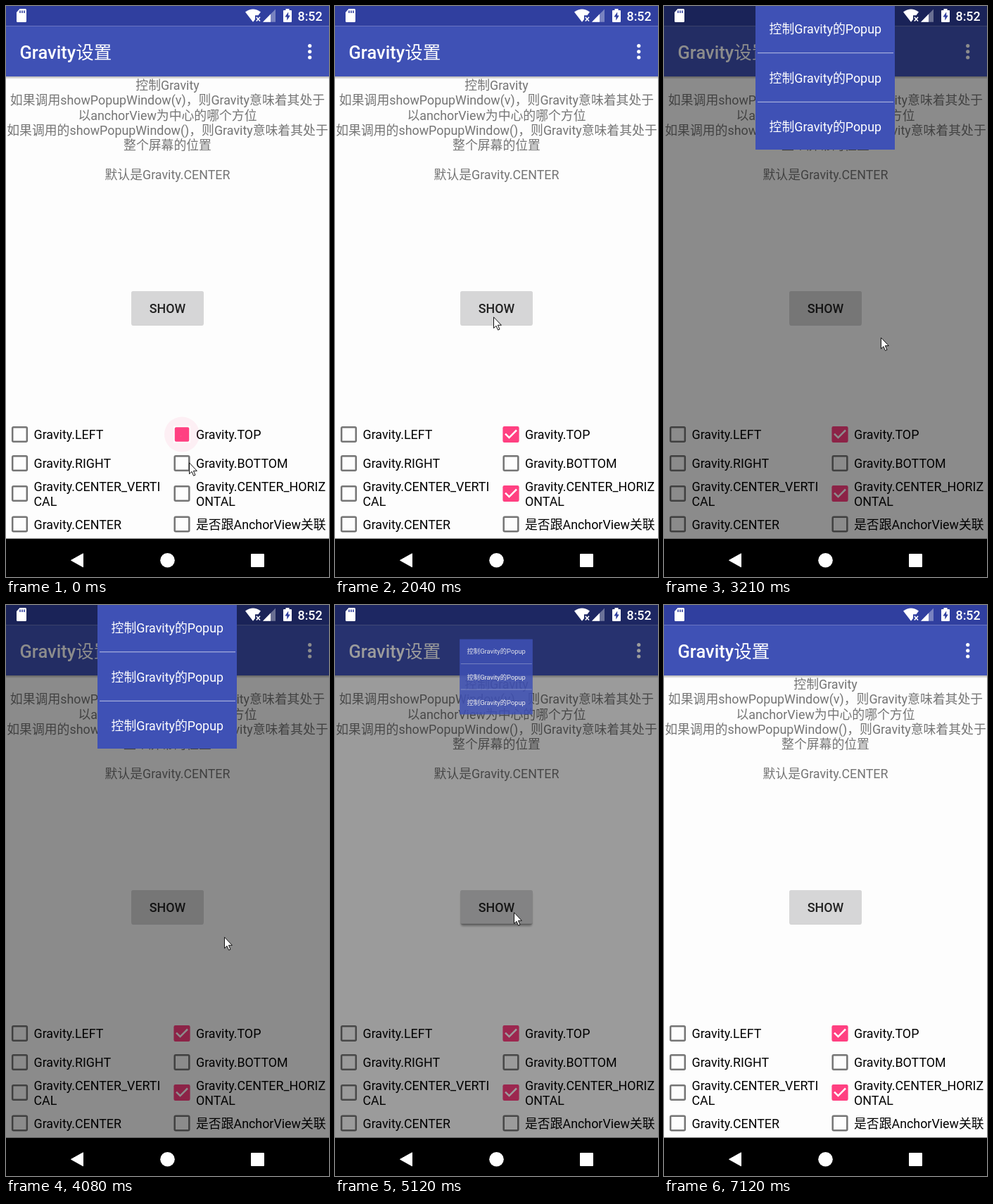
Animation of 459 by 811 pixels, one loop 7.74 s. Source, as an HTML page:

```html
<!DOCTYPE html>
<html lang="zh-CN">
<head>
<meta charset="utf-8">
<title>Gravity</title>
<style>
  html, body { margin: 0; width: 100%; height: 100%; overflow: hidden; background: #fdfdfd; }
  svg { display: block; width: 459px; height: 811px; }
  text { font: 17.85px Roboto, "Noto Sans CJK SC", "Noto Sans CJK", sans-serif; white-space: pre; }
  .mid { text-anchor: middle; }
  .bold { font-weight: 500; }
</style>
</head>
<body>
<svg viewBox="0 0 459 811" lang="zh-CN">
  <defs>
    <linearGradient id="shade" x2="0" y2="1">
      <stop offset="0" stop-color="#000" stop-opacity=".3"/>
      <stop offset="1" stop-color="#000" stop-opacity="0"/>
    </linearGradient>
    <filter id="blur" x="-20%" y="-20%" width="140%" height="140%"><feGaussianBlur stdDeviation="1.5"/></filter>
  </defs>

  <rect width="459" height="811" fill="#fdfdfd"/>
  <rect width="459" height="28.5" fill="#303f9f"/>
  <rect y="28.5" width="459" height="71.5" fill="#3f51b5"/>
  <rect y="100" width="459" height="4" fill="url(#shade)"/>
  <text class="bold" x="19.5" y="75" fill="#fff" style="font-size:25.5px">Gravity<tspan font-weight="400">设置</tspan></text>
  <g fill="#fff">
    <circle cx="431.7" cy="56.6" r="2.6"/><circle cx="431.7" cy="64.8" r="2.6"/><circle cx="431.7" cy="73" r="2.6"/>
  </g>
  <g id="intro" class="mid" fill="#757575"></g>

  <rect id="lift" x="179" y="408" width="101" height="48" rx="3" filter="url(#blur)" opacity="0"/>
  <rect x="178.3" y="406.3" width="102.4" height="47.7" rx="2.5" fill="#000" opacity=".16"/>
  <rect x="178" y="405" width="103" height="47.8" rx="2.5" fill="#d6d6d7"/>
  <text class="mid bold" x="229.5" y="435.6" fill="#212121">SHOW</text>

  <g id="options"></g>

  <rect id="dim" width="459" height="756.5" opacity="0"/>
  <g id="popup">
    <rect x="130" y="0" width="198" height="204" fill="#3f51b5"/>
    <path d="M133 66.7H326M133 136.3H326" stroke="#fff" stroke-opacity=".65" stroke-width="1"/>
    <g id="rows" class="mid" fill="#fff"></g>
  </g>

  <g fill="#fff">
    <path d="M19.5 4H27.5Q29 4 29 5.5V21.5Q29 23 27.5 23H16.5Q15 23 15 21.5V9Z"/>
    <path d="M20 6.5V10M23 6.5V10M26 6.5V10" stroke="#303f9f" stroke-width="1.6"/>
    <path d="M340 8.6Q351 .6 362 8.6L358.4 13.3H354V19L351 22.8Z"/>
    <path d="M355.8 15.8L361 21.5M361 15.8L355.8 21.5" stroke="#fff" stroke-width="1.7"/>
    <path d="M383 4.5V22.8H365Z" opacity=".35"/>
    <path d="M376 11.6V22.8H365Z"/>
    <path d="M397.5 4H402.5V6H405Q406 6 406 7V22Q406 23 405 23H395Q394 23 394 22V7Q394 6 395 6H397.5Z"/>
    <path d="M401.2 8.5L396.4 15.5H399.3V20.5L403.8 13.4H401.2Z" fill="#303f9f"/>
    <text class="bold" x="414.5" y="20.6">8:52</text>
  </g>

  <rect y="756.5" width="459" height="54.5"/>
  <g fill="#fff">
    <path d="M92.5 787.3L109.5 777.8V796.8Z" stroke="#fff" stroke-linejoin="round"/>
    <circle cx="229.5" cy="787.3" r="10.3"/>
    <rect x="348" y="778" width="19" height="19" rx="1"/>
  </g>

  <path id="cursor" d="M.5 .8V16.6L4 13.3 6.6 19.2 9 18.1 6.4 12.3H11.4Z" fill="#fff" stroke="#111" stroke-width="1" stroke-linejoin="round"/>
</svg>
<script>
const LOOP = 7740, DIM = 0.45, PINK = '#ff4081';
const $ = id => document.getElementById(id);

function add(parent, tag, attrs, text) {
  const el = document.createElementNS('http://www.w3.org/2000/svg', tag);
  for (const k in attrs) el.setAttribute(k, attrs[k]);
  if (text) el.textContent = text;
  parent.appendChild(el);
  return el;
}
const set = (el, attrs) => { for (const k in attrs) el.setAttribute(k, attrs[k]); };
const part = (t, a, b) => Math.min(1, Math.max(0, (t - a) / (b - a)));
const ease = p => p * p * (3 - 2 * p);

['控制Gravity',
 '如果调用showPopupWindow(v)，则Gravity意味着其处于',
 '以anchorView为中心的哪个方位',
 '如果调用的showPopupWindow()，则Gravity意味着其处于',
 '整个屏幕的位置', '',
 '默认是Gravity.CENTER'
].forEach((s, i) => add($('intro'), 'text', { x: 229.5, y: 119.3 + 21.1 * i }, s));

for (let i = 0; i < 3; i++)
  add($('rows'), 'text', { x: 229.3, y: 39 + 69.7 * i }, '控制Gravity的Popup');

const rowY = [608.5, 649.5, 692.5, 736];
const labels = [
  [['Gravity.LEFT'], ['Gravity.RIGHT'], ['Gravity.CENTER_VERTI', 'CAL'], ['Gravity.CENTER']],
  [['Gravity.TOP'], ['Gravity.BOTTOM'], ['Gravity.CENTER_HORIZ', 'ONTAL'], ['是否跟AnchorView关联']]
];
labels.forEach((col, c) => col.forEach((lines, r) => {
  const x = 19.5 + 230.5 * c, y = rowY[r];
  add($('options'), 'rect', { x: x - 10.3, y: y - 10.3, width: 20.6, height: 20.6, rx: 1.5,
    fill: 'none', stroke: '#757575', 'stroke-width': 2.5 });
  const base = lines.length > 1 ? y - 3.4 : y + 6.7;
  lines.forEach((s, i) => add($('options'), 'text', { x: x + 20, y: base + 21 * i }, s));
}));

// Pink state of a checkbox, drawn over its grey outline
function makeCheck(y) {
  const g = add($('options'), 'g', { transform: `translate(250 ${y})` });
  const ripple = add(g, 'circle', { fill: PINK });
  const back = add(g, 'rect', { x: -12, y: -12, width: 24, height: 24, fill: '#fdfdfd' });
  const box = add(g, 'g', {});
  add(box, 'rect', { x: -11.6, y: -11.6, width: 23.2, height: 23.2, rx: 2.3, fill: PINK });
  const hole = add(box, 'rect', { fill: '#fdfdfd' });
  const tick = add(box, 'path', { d: 'M-8 -.9L-2.5 4.6L8 -6', fill: 'none', stroke: '#fff', 'stroke-width': 2.5 });
  return (p, radius, alpha) => {
    set(ripple, { r: radius, opacity: alpha });
    const on = p > 0 ? 'inline' : 'none';
    set(back, { display: on });
    set(box, { display: on, transform: `scale(${1 - 0.12 * Math.sin(Math.PI * p)})` });
    const h = 18 * (1 - part(p, 0, 0.42));
    set(hole, { x: -h / 2, y: -h / 2, width: h, height: h });
    const k = part(p, 0.42, 1);
    set(tick, { transform: `translate(${-2 * (1 - k)} ${3 * (1 - k)}) scale(${k})` });
  };
}
const topCheck = makeCheck(rowY[0]), horizCheck = makeCheck(rowY[2]);

// start, end, target x, target y
const moves = [
  [200, 530, 258, 688],
  [1500, 2040, 225, 441],
  [2930, 3240, 310, 471],
  [4260, 4600, 254, 436],
  [5230, 5470, 290, 471],
  [6680, 7120, 300, 815]
];
function cursorAt(t) {
  let x = 260, y = 648;
  for (const [a, b, tx, ty] of moves) {
    const p = ease(part(t, a, b));
    x += (tx - x) * p;
    y += (ty - y) * p;
  }
  return [x, y];
}

// open time, close time
const shows = [[2650, 4085], [4995, 6445]];
function popupAt(t) {
  for (const [a, b] of shows) {
    if (t >= a && t < b) {
      const p = part(t, a, a + 200);
      return [p ** 1.4, 1 - (1 - p) ** 2];
    }
    if (t >= b && t < b + 230) {
      const p = part(t, b, b + 230);
      return [1 - p ** 1.4, 1 - p * p];
    }
  }
  return [0, 0];
}

const press = (t, a, b) => part(t, a, a + 60) * (1 - part(t, b, b + 150));

function draw(t) {
  topCheck(0.47 + 0.53 * part(t, 0, 180), 25, 0.07 * (1 - part(t, 20, 350)));
  horizCheck(part(t, 1240, 1540), 25 * ease(part(t, 1240, 1400)), 0.07 * (1 - part(t, 1480, 1780)));
  set($('lift'), { opacity: 0.32 * (press(t, 2400, 2800) + press(t, 4810, 5150)) });
  const [scale, fade] = popupAt(t);
  set($('dim'), { opacity: DIM * fade });
  set($('popup'), { opacity: fade, display: scale > 0 ? 'inline' : 'none',
    transform: `translate(229 102) scale(${scale}) translate(-229 -102)` });
  set($('cursor'), { transform: `translate(${cursorAt(t)})` });
}

const start = performance.now();
function tick(now) {
  draw(Math.max(0, now - start) % LOOP);
  requestAnimationFrame(tick);
}
draw(0);
requestAnimationFrame(tick);
</script>
</body>
</html>
```
